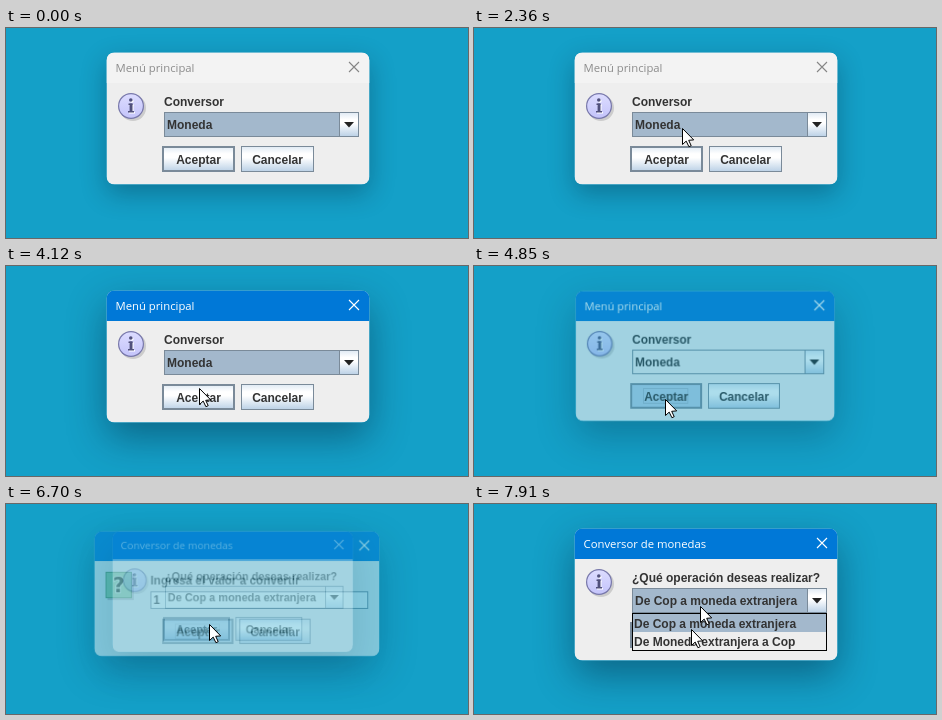
These frames come from a looping animation (462x210 px, 7990 ms). An HTML page with a canvas:

```html
<!DOCTYPE html>
<html lang="es">
<head>
<meta charset="utf-8">
<style>
html, body { margin: 0; width: 100%; height: 100%; overflow: hidden; background: #14a0c8; }
canvas { display: block; width: 462px; height: 210px; }
</style>
</head>
<body>
<canvas id="stage"></canvas>
<script>
const W = 462, H = 210, LOOP = 7990, STEP = 80;
const dpr = window.devicePixelRatio || 1;
const stage = document.getElementById('stage');
const layer = document.createElement('canvas');
for (const c of [stage, layer]) { c.width = W * dpr; c.height = H * dpr; }
const main = stage.getContext('2d'), g = layer.getContext('2d');

const BOLD = 'bold 12px "Liberation Sans", Arial, sans-serif';
const TITLE = '11.3px "Open Sans", "Noto Sans", sans-serif';
const EDGE = '#7a8a99', SELECT = '#a3b8cc', FACE = '#eeeeee', INK = '#333333';

const MENU = { x: 100.5, y: 24.5, w: 263, h: 132 };
const INPUT = { x: 86.5, y: 26.5, w: 292, h: 128 };

// Pointer stops: [arrival, x, y]
const stops = [
  [930, 265, 11], [1170, 150, -30], [1410, 134, 36], [1570, 139, 38], [2210, 199, 116],
  [2370, 208, 100], [2930, 201, 121], [3330, 198, 139], [3650, 193, 122], [4450, 191, 133],
  [5250, 214, 103], [6370, 203, 120], [7090, 226, 102], [7570, 221, 112], [7890, 217, 125]
];
const MS_PER_PX = 6;

const clamp = v => Math.min(1, Math.max(0, v));

// Rests at each stop, then leaves just in time to reach the next one.
function pointer(t) {
  let at = [300, -40], last = 0;
  for (const [end, x, y] of stops) {
    const dx = x - at[0], dy = y - at[1];
    const span = Math.min(end - last, Math.hypot(dx, dy) * MS_PER_PX);
    const k = clamp((t - end) / span + 1);
    if (k < 1) return [at[0] + dx * k, at[1] + dy * k].map(Math.round);
    at = [x, y];
    last = end;
  }
  return at;
}

function opening(t, start) {
  const k = clamp((t - start) / 320);
  return { scale: 0.89 + 0.11 * k * k * (3 - 2 * k), opacity: k };
}

function closing(t, start) {
  const k = clamp((t - start) / 320);
  return { scale: 1 - 0.06 * k * k, opacity: 1 - k ** 1.5 };
}

function box(x, y, w, h, fill, edge, line = 1) {
  g.fillStyle = fill;
  g.fillRect(x, y, w, h);
  if (!edge) return;
  g.strokeStyle = edge;
  g.lineWidth = line;
  g.strokeRect(x + line / 2, y + line / 2, w - line, h - line);
}

function text(s, x, y, color = INK, font = BOLD, align = 'left') {
  g.font = font;
  g.fillStyle = color;
  g.textAlign = align;
  g.fillText(s, x, y);
}

function disc(x, y, r, fill) {
  g.fillStyle = fill;
  g.beginPath();
  g.arc(x, y, r, 0, 7);
  g.fill();
}

function sheen(y, h) {
  const grad = g.createLinearGradient(0, y, 0, y + h);
  grad.addColorStop(0, '#dde8f3');
  grad.addColorStop(0.3, '#ffffff');
  grad.addColorStop(0.45, '#ffffff');
  grad.addColorStop(1, '#b8cfe5');
  return grad;
}

function buttons(y, pressed) {
  box(156, y, 73, 26, pressed ? '#b8cfe5' : sheen(y, 26), EDGE, 2);
  if (pressed) box(169, y + 5, 46, 16, 'transparent', SELECT);
  text('Aceptar', 192.5, y + 18, INK, BOLD, 'center');
  box(235, y, 73, 26, sheen(y, 26), EDGE);
  text('Cancelar', 271.5, y + 18, INK, BOLD, 'center');
}

function frame({ x, y, w, h }, title, active) {
  g.setTransform(dpr, 0, 0, dpr, 0, 0);
  g.clearRect(0, 0, W, H);
  g.save();
  g.beginPath();
  g.roundRect(x, y, w, h, 8);
  g.clip();
  box(x, y, w, h, FACE);
  box(x, y, w, 30.5, active ? '#0078d7' : '#f3f3f3');
  g.restore();
  text(title, x + 9, y + 19.5, active ? '#ffffff' : '#8c8c8c', TITLE);
  const cx = x + w - 15.5, cy = y + 14.5;
  g.strokeStyle = active ? '#ffffff' : '#858585';
  g.lineWidth = 1.1;
  g.beginPath();
  for (const d of [-5, 5]) {
    g.moveTo(cx - 5, cy - d);
    g.lineTo(cx + 5, cy + d);
  }
  g.stroke();
}

function infoIcon() {
  disc(127, 80, 13, '#cccccc');
  disc(125, 78, 13, '#7777aa');
  const grad = g.createLinearGradient(0, 66, 0, 90);
  grad.addColorStop(0, '#dcdcff');
  grad.addColorStop(1, '#c4c4fa');
  disc(125, 78, 11.8, grad);
  const mark = (d, color) => {
    disc(124.8 + d, 72 + d, 1.8, color);
    g.fillRect(122.5 + d, 75.5 + d, 4, 1.5);
    g.fillRect(123.6 + d, 75.5 + d, 2.9, 8.5);
    g.fillRect(122 + d, 83 + d, 6, 1.5);
  };
  mark(1, '#ffffff');
  mark(0, '#50507c');
}

function questionIcon() {
  box(100, 70, 27, 27, '#c4c4c4');
  box(98, 68, 27, 27, '#99cc99', '#669966');
  const font = 'bold 21px "DejaVu Sans", Verdana, sans-serif';
  g.font = font;
  g.textAlign = 'center';
  g.lineWidth = 2;
  g.strokeStyle = '#d5f0d5';
  g.strokeText('?', 111.5, 89);
  text('?', 111.5, 89, '#001a00', font, 'center');
}

function comboDialog({ title, label, items, active = true, focused, pressed, popup, row }) {
  frame(MENU, title, active);
  infoIcon();
  text(label, 158, 78);
  buttons(118, pressed);
  box(158, 84, 195, 25, focused ? SELECT : FACE, EDGE);
  box(333, 84, 20, 25, sheen(84, 25), EDGE);
  g.fillStyle = '#222222';
  g.beginPath();
  g.moveTo(338, 94);
  g.lineTo(348, 94);
  g.lineTo(343, 99.5);
  g.fill();
  text(items[0], 161, 101);
  if (!popup) return;
  box(158, 109, 195, 38, FACE, '#000000');
  box(159, 110 + row * 18, 193, 18, SELECT);
  items.forEach((s, i) => text(s, 160, 124 + i * 18));
}

function inputDialog(value, caret, pressed) {
  frame(INPUT, '', true);
  questionIcon();
  text('Ingresa el valor a convertir', 144, 81);
  box(144, 88, 223, 18, '#ffffff', EDGE);
  text(value, 147, 101);
  if (caret) box(value ? 153 : 146, 89, 1, 16, INK);
  buttons(116, pressed);
}

// Puts the drawn dialog on stage; its shadow stays outside the window.
function place({ x, y, w, h }, { scale, opacity }, active = true) {
  const shrink = 1 - scale;
  main.save();
  main.globalAlpha = opacity;
  main.translate(x + shrink * w * 0.26, y + shrink * h * 0.25);
  main.scale(scale, scale);

  main.save();
  main.beginPath();
  main.rect(-W, -H, 3 * W, 3 * H);
  main.roundRect(0, 0, w, h, 8);
  main.clip('evenodd');
  main.shadowColor = `rgba(0,25,45,${active ? 0.42 : 0.32})`;
  main.shadowBlur = (active ? 38 : 26) * dpr;
  main.shadowOffsetY = (active ? 15 : 9) * dpr;
  main.fillStyle = '#0b82b2';
  main.beginPath();
  main.roundRect(0, 0, w, h, 8);
  main.fill();
  main.restore();

  main.drawImage(layer, -x, -y, W, H);
  main.restore();
}

const arrowShape = [[0, 0], [0, 16], [3.7, 12.6], [6.4, 18.2], [8.7, 17.2], [6.2, 11.8], [11.2, 11.4]];

function arrow(x, y) {
  main.beginPath();
  for (const [dx, dy] of arrowShape) main.lineTo(x + 0.5 + dx, y + 0.5 + dy);
  main.closePath();
  main.fillStyle = '#ffffff';
  main.fill();
  main.strokeStyle = '#000000';
  main.lineWidth = 1;
  main.stroke();
}

function beam(x, y) {
  main.fillStyle = '#000000';
  main.fillRect(x, y - 7, 1, 15);
  for (const dy of [-7, 7]) {
    main.fillRect(x - 3, y + dy, 3, 1);
    main.fillRect(x + 1, y + dy, 3, 1);
  }
}

function draw(time) {
  // The screen refreshes in even steps.
  const t = 50 + STEP * Math.floor((time - 35) / STEP);
  const [px, py] = pointer(t);
  const row = py >= 128 ? 1 : 0;
  const popup = t >= 7250;

  main.setTransform(dpr, 0, 0, dpr, 0, 0);
  main.fillStyle = '#14a0c8';
  main.fillRect(0, 0, W, H);

  if (t < 5010) {
    const active = t >= 2600, pressed = t >= 4690;
    comboDialog({
      title: 'Menú principal', label: 'Conversor', items: ['Moneda', 'Temperatura'],
      active, pressed, focused: !pressed, popup: t >= 2680 && t < 4120, row
    });
    place(MENU, closing(t, 4690), active);
  }
  if (t > 4850 && t < 6810) {
    const caret = Math.floor((t - 4910) / 490) % 2 === 0;
    inputDialog(t >= 6130 ? '1' : '', caret, t >= 6490);
    place(INPUT, t < 6000 ? opening(t, 4850) : closing(t, 6490));
  }
  if (t > 6590) {
    comboDialog({
      title: 'Conversor de monedas', label: '¿Qué operación deseas realizar?',
      items: ['De Cop a moneda extranjera', 'De Moneda extranjera a Cop'],
      focused: t >= 6930, popup, row
    });
    place(MENU, opening(t, 6590));
  }

  if (popup) arrow(226, 102);
  const overField = t >= 5250 && t < 6300;
  (overField ? beam : arrow)(px, py);
}

const start = performance.now();
function tick() {
  draw((performance.now() - start) % LOOP);
  requestAnimationFrame(tick);
}
tick();
</script>
</body>
</html>
```
